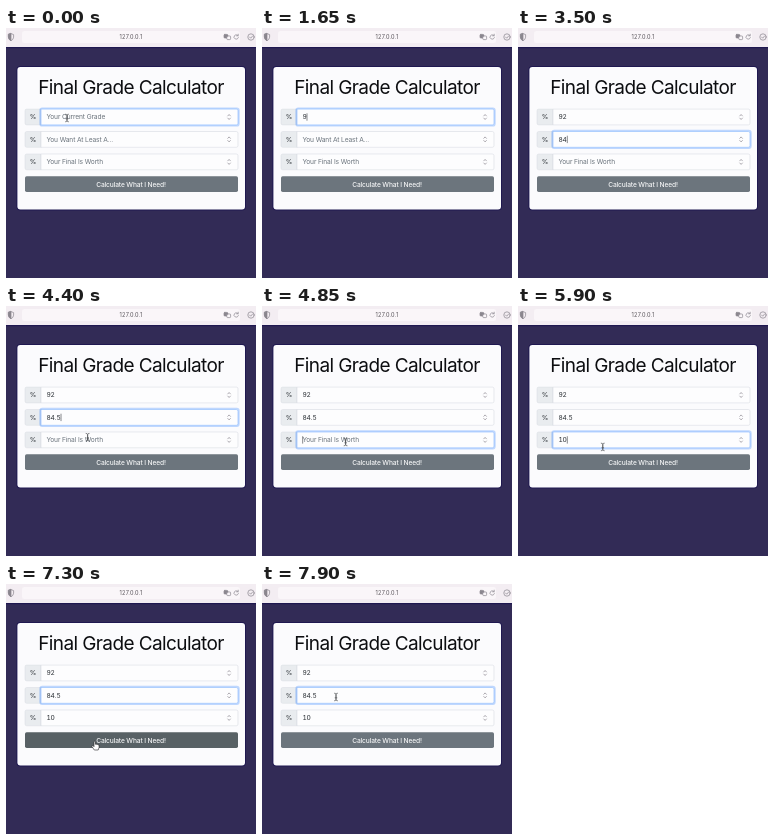
Write an HTML page that moves like this. It is 250x250 px and loops after 8000 ms.

```html
<!DOCTYPE html>
<html lang="en">
<head>
<meta charset="utf-8">
<title>Final Grade Calculator</title>
<style>
  html, body { margin: 0; width: 100%; height: 100%; overflow: hidden; background: #322b56; }
  svg { display: block; width: 100vw; height: 100vh; }
  text { font: 6.67px Inter, "Open Sans", sans-serif; letter-spacing: -.02em; font-optical-sizing: none; }
  .title { font-size: 19px; letter-spacing: -.6px; fill: #0c0d10; }
  .address { font-size: 5.6px; letter-spacing: .03em; fill: #5a565c; }
  .label { font-weight: 500; fill: #f4f5f6; }
  .mid { text-anchor: middle; }
  .hint { fill: #6c757d; }
  .value { fill: #2c3136; font-variant-numeric: tabular-nums; }
  .icon { fill: none; stroke: #8a868e; stroke-width: .7; stroke-linecap: round; stroke-linejoin: round; }
  .solid { fill: #8a868e; }
</style>
</head>
<body>
<svg viewBox="0 0 250 250">
  <rect width="250" height="250" fill="#322b56"/>

  <rect width="250" height="20.2" fill="#1f1850"/>
  <rect width="250" height="19" fill="#f3edf2"/>
  <rect x="16" y="3" width="218" height="12" rx="2.5" fill="#faf6f9"/>
  <text class="address mid" x="125" y="11">127.0.0.1</text>
  <g class="icon">
    <path d="M5 5.6L7.6 6.6V9.2Q7.4 11.6 5 12.8Q2.6 11.6 2.4 9.2V6.6Z"/>
    <path class="solid" d="M5 5.6V12.8Q2.6 11.6 2.4 9.2V6.6Z"/>
    <rect class="solid" x="218" y="6.4" width="3.8" height="3.6" rx=".8"/>
    <rect x="220.8" y="8" width="3.8" height="3.6" rx=".8" fill="#faf6f9"/>
    <path d="M232 7.6A2.2 2.2 0 1 0 232.4 9.6M232.2 6.2V7.8H230.6"/>
    <circle cx="245" cy="9" r="3.2"/>
    <path d="M243.5 9L244.7 10.2L246.7 7.9"/>
  </g>

  <rect x="11.4" y="38.9" width="227.6" height="142.7" rx="3" fill="#fbfbfd" stroke="#1f1850" stroke-width="2" paint-order="stroke"/>
  <text class="title mid" x="125" y="66">Final Grade Calculator</text>
  <g id="rows"></g>
  <rect id="button" x="19" y="148.2" width="213" height="15.8" rx="1.7"/>
  <text class="label mid" x="125" y="158.5">Calculate What I Need!</text>

  <rect id="caret" width=".6" height="7.4" fill="#3a3d42"/>
  <g id="pointer">
    <path id="beam" d="M-1.5 -3.8Q0 -3.8 0 -2.8V2.8Q0 3.8 -1.5 3.8M1.5 -3.8Q0 -3.8 0 -2.8V2.8Q0 3.8 1.5 3.8M-.9 .8H.9"
      fill="none" stroke="#4a4c50" stroke-width=".65" stroke-linecap="round"/>
    <path id="arrow" d="M0 -3.5V4L1.7 2.5L2.9 5.2L4 4.7L2.8 2.1H5Z" fill="#111" stroke="#fff" stroke-width=".6"/>
    <path id="hand" d="M-1.5 .6V-3.2Q-.8 -4.4 -.1 -3.2V-.7Q.8 -1.3 1.3 -.5Q2.2 -.9 2.5 -.1Q3.6 -.4 3.6 .7V2.3L2.7 5H-1.2L-3.6 1.5Q-3.7 .2 -2.5 .6L-1.5 1.7Z" fill="#fff" stroke="#222" stroke-width=".6"/>
  </g>
</svg>
<script>
  const LOOP = 8000, STEP = 50, FADE = 150;
  const $ = id => document.getElementById(id);

  // typed: [time, value]; focus: [from, to]
  const fields = [
    { hint: "Your Current Grade", mid: 89, typed: [[1650, "9"], [1800, "92"]], focus: [[-FADE, 2370]] },
    { hint: "You Want At Least A...", mid: 111.4, typed: [[3200, "8"], [3500, "84"], [3750, "84."], [4000, "84.5"]],
      focus: [[2420, 4700], [6400, LOOP + FADE]] },
    { hint: "Your Final Is Worth", mid: 133.9, typed: [[5400, "1"], [5550, "10"]], focus: [[4700, 6250]] }
  ];

  // [field, on, off]
  const carets = [
    [0, 250, 750], [0, 1200, 2300], [1, 2450, 2950], [1, 3200, 4500],
    [2, 4750, 5250], [2, 5400, 6050], [1, 6350, 6900], [1, 7400, 7900]
  ];

  // [appears, arrives, hides, from, to]
  const trips = [
    [0, 0, 1650, [61, 90], [61, 90]],
    [2000, 2400, 3200, [61, 90], [73.5, 112]],
    [4150, 4500, 5400, [73.5, 112], [83.6, 136]],
    [5800, 6150, 7300, [83.6, 136], [89.5, 161]],
    [7300, 7900, LOOP, [89.5, 161], [74, 113]]
  ];

  const clamp = v => Math.max(0, Math.min(1, v));
  const ease = p => p * p * (3 - 2 * p);
  const mix = (a, b, p) => a + (b - a) * p;
  const rgb = (a, b, p) => `rgb(${a.map((v, i) => Math.round(mix(v, b[i], p)))})`;
  const show = (el, on) => el.setAttribute("visibility", on ? "visible" : "hidden");
  const level = (t, spans) => Math.max(...spans.map(([from, to]) =>
    ease(clamp((t - from) / FADE)) * (1 - ease(clamp((t - to) / FADE)))));

  for (const f of fields) {
    const top = f.mid - 7.9, base = f.mid + 2.4;
    const g = document.createElementNS("http://www.w3.org/2000/svg", "g");
    g.innerHTML = `
      <path d="M35 ${top}H20.7Q19 ${top} 19 ${top + 1.7}v12.4q0 1.7 1.7 1.7H35z" fill="#e9ecef" stroke="#d6dae0" stroke-width=".5"/>
      <text class="value mid" x="27" y="${base}">%</text>
      <rect x="34.2" y="${top - .8}" width="198.6" height="17.4" rx="2" fill="none" stroke="#0d6efd" stroke-opacity=".25" stroke-width="1.7"/>
      <path d="M35 ${top}H230.3q1.7 0 1.7 1.7v12.4q0 1.7 -1.7 1.7H35z" fill="#fdfdfe" stroke-width=".6"/>
      <text x="40.4" y="${base}"></text>
      <path class="icon" d="M221.8 ${f.mid - 1.1}l1.3 -1.4l1.3 1.4m-2.6 2.2l1.3 1.4l1.3 -1.4"/>`;
    $("rows").append(g);
    [, , f.glow, f.box, f.text] = g.children;
  }

  function drawField(f, t) {
    const last = f.typed.filter(([at]) => t >= at).pop();
    const text = last ? last[1] : f.hint;
    if (f.text.textContent !== text) f.text.textContent = text;
    f.text.setAttribute("class", last ? "value" : "hint");
    const lit = level(t, f.focus);
    f.glow.setAttribute("opacity", lit);
    f.box.setAttribute("stroke", rgb([216, 220, 226], [134, 183, 254], lit));
    f.end = 40.8 + (last ? f.text.getComputedTextLength() : 0);
  }

  function drawCaret(t) {
    const on = carets.find(([, from, to]) => t >= from && t < to);
    show($("caret"), on);
    if (!on) return;
    const f = fields[on[0]];
    $("caret").setAttribute("x", f.end - .3);
    $("caret").setAttribute("y", f.mid - 3.7);
  }

  function drawPointer(t) {
    const trip = trips.find(([from, , to]) => t >= from && t < to);
    let shape = "";
    if (trip) {
      const [start, arrive, , from, to] = trip;
      const p = arrive > start ? ease(clamp((t - start) / (arrive - start))) : 1;
      const x = mix(from[0], to[0], p), y = mix(from[1], to[1], p);
      $("pointer").setAttribute("transform", `translate(${x} ${y})`);
      shape = y > 148 ? "hand" : fields.some(f => Math.abs(y - f.mid) < 8) ? "beam" : "arrow";
    }
    for (const id of ["beam", "arrow", "hand"]) show($(id), id === shape);
  }

  function draw(now) {
    const t = Math.floor(now % LOOP / STEP) * STEP;
    fields.forEach(f => drawField(f, t));
    drawCaret(t);
    drawPointer(t);
    $("button").setAttribute("fill", rgb([108, 117, 125], [88, 97, 101], level(t, [[5950, 7400]])));
  }

  const begin = performance.now();
  function tick() {
    draw(performance.now() - begin);
    requestAnimationFrame(tick);
  }
  tick();
</script>
</body>
</html>
```
